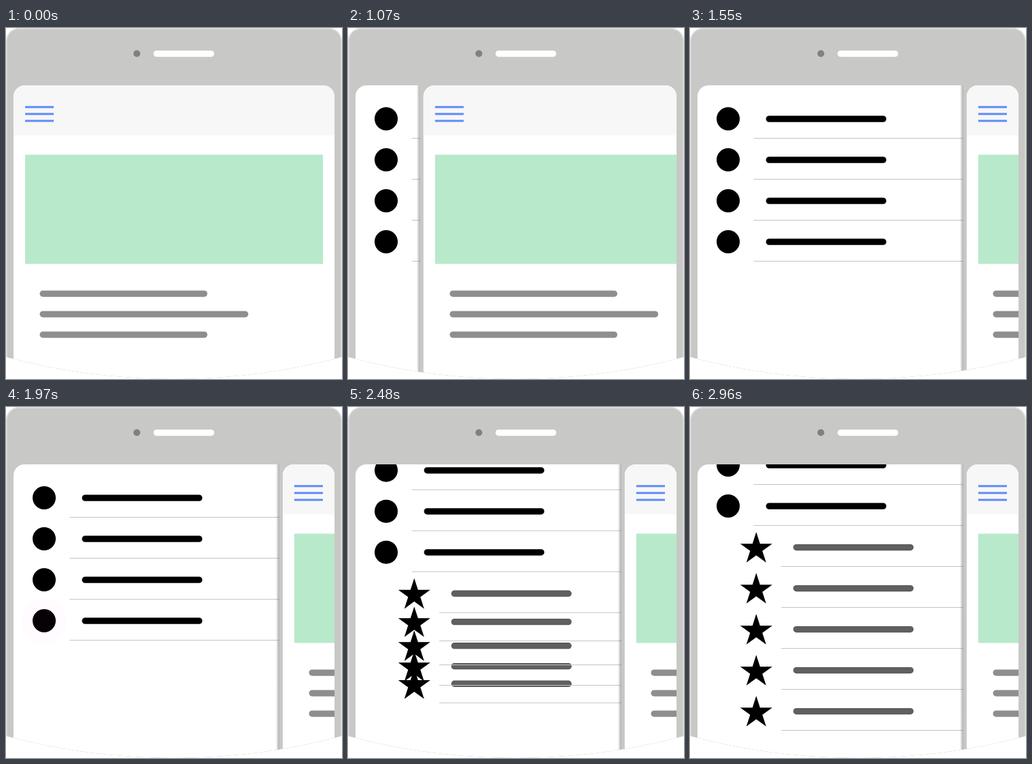
Animation of 493x514 px, one loop 3.96 s. Source, as an HTML page with a canvas:

```html
<!DOCTYPE html>
<html lang="en">
<head>
<meta charset="utf-8">
<title>Side menu</title>
<style>
  html, body { margin: 0; width: 100%; height: 100%; overflow: hidden; background: #fff; }
  canvas { display: block; }
</style>
</head>
<body>
<canvas id="stage" width="493" height="514"></canvas>
<script>
const ctx = document.getElementById('stage').getContext('2d');
const W = 493, H = 514, LOOP = 3960, STEP = 60, ROW = 60;
const SCREEN = { left: 11, top: 84, width: 471, radius: 16 };
const GREY = '#c8c8c6';
const OPEN = 395, SCROLL = 168;
const SUBS = 5;

// Start and last step of each run of motion
const RUNS = [[0, 0], [500, 920], [1010, 2030], [2120, 2960]];

function snap(t) {
  const [start, end] = RUNS.filter(run => run[0] <= t).pop();
  return Math.min(end, start + STEP * Math.floor((t - start) / STEP));
}

// Brisk start, soft landing
function progress(t, start, duration) {
  const u = Math.min(1, Math.max(0, (t - start) / duration));
  return u * (1.18 + u * (0.56 - 0.74 * u));
}

function rect(x, y, w, h, color) {
  ctx.fillStyle = color;
  ctx.fillRect(x, y, w, h);
}

function roundRect(x, y, w, h, r, color) {
  ctx.beginPath();
  ctx.roundRect(x, y, w, h, r);
  ctx.fillStyle = color;
  ctx.fill();
}

function disc(x, y, r, color) {
  ctx.beginPath();
  ctx.arc(x, y, r, 0, Math.PI * 2);
  ctx.fillStyle = color;
  ctx.fill();
}

function star(x, y, r) {
  ctx.beginPath();
  for (let i = 0; i < 10; i++) {
    const a = i * Math.PI / 5 - Math.PI / 2;
    const d = i % 2 ? r * 0.382 : r;
    ctx.lineTo(x + d * Math.cos(a), y + d * Math.sin(a));
  }
  ctx.closePath();
  ctx.fillStyle = '#000';
  ctx.fill();
}

function ripple(t, start, x, y) {
  const k = (t - start) / (7 * STEP);
  if (k < 0 || k >= 1) return;
  disc(x, y, 18 + 18 * k, `rgba(226, 80, 246, ${0.16 * (1 - k)})`);
}

function phone() {
  roundRect(0, 0, W, H + 40, 19, '#dededc');
  roundRect(1.7, 1.7, W - 3.4, H + 40, 17.5, GREY);
  disc(192, 37.5, 5, '#808080');
  roundRect(216.5, 33, 89, 9.3, 4.6, '#fff');
}

function divider(x, y) {
  rect(x, y - 0.5, 401 - x, 1, '#c2c4c3');
}

function menu(t) {
  const base = 161.5 - SCROLL * progress(t, 2060, 900);
  for (let i = 0; i < 4; i++) {
    const y = base + i * ROW;
    disc(56, y - 28.5, 17, '#000');
    roundRect(111.5, y - 33, 176.5, 9.3, 4.6, '#000');
    divider(93.5, y);
  }
  if (t < 2120) return;

  const lines = [];
  for (let i = 0; i < SUBS; i++) {
    const spread = i * ROW * progress(t, 2120, 600 + i * STEP);
    lines.push(base + 4 * ROW + spread);
  }
  for (const y of lines) {
    star(97.2, y - 25.7, 24.7);
    roundRect(151.5, y - 32.6, 176.5, 9.3, 4.6, '#505050');
    roundRect(152.2, y - 31.9, 175.1, 7.9, 4, '#606060');
  }
  lines.forEach(y => divider(134, y));
}

function drawer(t, shift) {
  const right = shift + 6;
  ctx.save();
  ctx.beginPath();
  ctx.rect(0, SCREEN.top, right, H);
  ctx.clip();
  rect(0, SCREEN.top, right, H, '#fff');
  menu(t);
  const shade = ctx.createLinearGradient(right - 5, 0, right, 0);
  shade.addColorStop(0, 'rgba(90, 90, 90, 0)');
  shade.addColorStop(1, 'rgba(90, 90, 90, 0.5)');
  rect(right - 5, SCREEN.top, 5, H, shade);
  ctx.restore();
}

function page(shift) {
  ctx.save();
  ctx.translate(shift, 0);
  ctx.beginPath();
  ctx.roundRect(SCREEN.left, SCREEN.top, SCREEN.width, H, SCREEN.radius);
  ctx.clip();
  rect(0, SCREEN.top, W, H, '#fff');
  rect(0, SCREEN.top, W, 73, '#f7f7f7');
  for (let i = 0; i < 3; i++) rect(28, 114.3 + i * 10.1, 42, 3, '#5f8cfa');
  rect(28, 185.5, 437, 160, '#b8e9cb');
  [246, 306, 246].forEach((w, i) => roundRect(49.5, 384.5 + i * 30, w, 9.2, 4.6, '#8e8e8e'));
  ctx.restore();
}

function draw(t) {
  const shift = OPEN * progress(t, 950, 600);
  rect(0, 0, W, H, '#fff');
  ctx.save();
  // The device fades out of view along a wide arc
  ctx.beginPath();
  ctx.arc(W / 2, H - 961, 961, 0, Math.PI * 2);
  ctx.clip();
  phone();
  ctx.beginPath();
  ctx.roundRect(SCREEN.left, SCREEN.top, SCREEN.width, H, SCREEN.radius);
  ctx.clip();
  rect(0, SCREEN.top, W, H, GREY);
  drawer(t, shift);
  page(shift);
  ripple(t, 500, 49.3, 125);
  ripple(t, 1610, 56, 313);
  ctx.restore();
}

const begin = performance.now();
function tick() {
  draw(snap((performance.now() - begin) % LOOP));
  requestAnimationFrame(tick);
}
tick();
</script>
</body>
</html>
```
